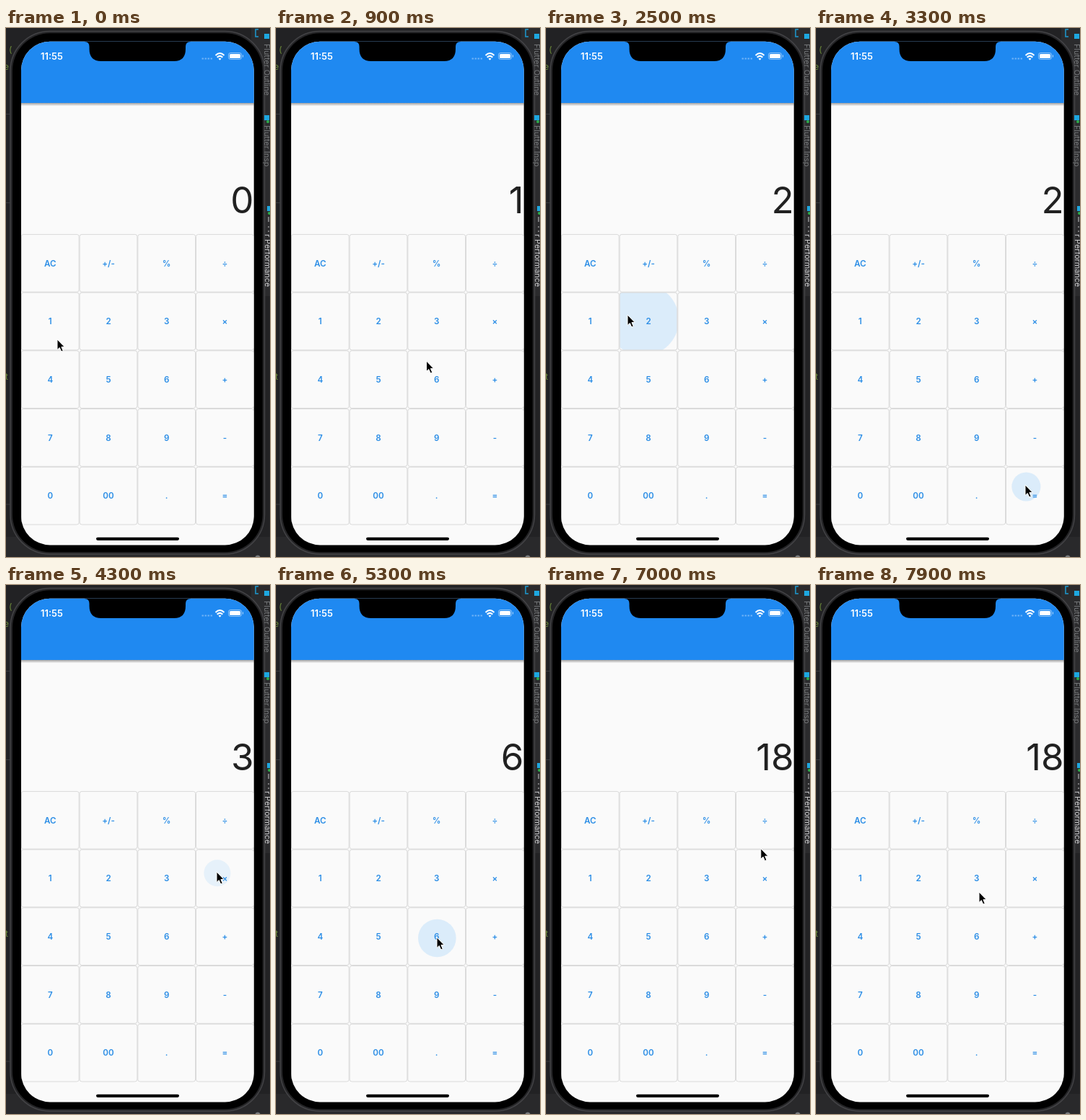
An HTML page for the animation above (8000 ms loop, 366 by 734 pixels).

```html
<!DOCTYPE html>
<html lang="en">
<head>
<meta charset="utf-8">
<title>Calculator</title>
<style>
  html, body { margin: 0; height: 100%; overflow: hidden; background: #202022; }
  svg { display: block; width: 366px; height: 734px; }
  text { font-family: Inter, Roboto, sans-serif; }
  .key text { font-size: 11.6px; font-weight: 600; fill: #2c8ee6; text-anchor: middle; }
  .side { font-size: 10.8px; fill: #77797b; }
</style>
</head>
<body>
<svg viewBox="0 0 366 734">
  <defs>
    <clipPath id="screen"><rect x="21" y="18.800" width="322.700" height="698.600" rx="40"/></clipPath>
    <linearGradient id="shade" x2="0" y2="1">
      <stop stop-color="#000" stop-opacity=".35"/>
      <stop offset="1" stop-color="#000" stop-opacity="0"/>
    </linearGradient>
  </defs>

  <!-- desktop behind the phone -->
  <rect width="366" height="734" fill="#222224"/>
  <rect x="340" width="26" height="372" fill="#2b2b2d"/>
  <path d="M0 119.500H6M0 242.500H6M0 661H6" stroke="#3b3b3d"/>
  <rect y="706" width="366" height="28" fill="#29292b"/>
  <g font-size="12" fill="#6d8c3a">
    <text x="4" y="34">(</text>
    <text x="-3" y="58">e</text>
    <text x="-1" y="488">t</text>
  </g>
  <path d="M350 2H346V12H350" fill="none" stroke="#1c9ad0" stroke-width="1.500"/>
  <circle cx="349" cy="735" r="3.500" fill="#77797b"/>

  <!-- phone -->
  <rect x="6" y="4.500" width="352.500" height="725.500" rx="55" fill="#242426" stroke="#434346" stroke-width="1.500"/>
  <rect x="9" y="7.300" width="346.700" height="720" rx="52" fill="#000"/>

  <g fill="#1ea7e0">
    <rect x="358" y="8" width="7" height="7"/>
    <rect x="358" y="121" width="7" height="7"/>
    <rect x="362" y="247" width="4" height="7"/>
  </g>
  <g fill="#2fae4b">
    <circle cx="363" cy="130" r="2"/>
    <circle cx="365" cy="257" r="2"/>
  </g>
  <text class="side" transform="translate(358 22) rotate(90)">Flutter Outline</text>
  <text class="side" transform="translate(358 135) rotate(90)">Flutter Insp</text>
  <text class="side" transform="translate(359 286) rotate(90)" style="fill:#d0d0d2">r Performance</text>
  <path d="M364 262V269M364 275V277M364 281V283" stroke="#c8c8ca"/>

  <g clip-path="url(#screen)">
    <rect x="20" y="18" width="325" height="701" fill="#fafafa"/>
    <rect x="20" y="104" width="325" height="4.500" fill="url(#shade)"/>
    <rect x="20" y="18" width="325" height="86" fill="#1f89f1"/>
    <path d="M109 18V19Q115.500 19 115.500 26V29Q115.500 46 132 46H233Q249 46 249 29V26Q249 19 256 19V18Z"/>
    <text x="48" y="44" font-size="12.900" font-weight="600" fill="#fff">11:55</text>
    <path d="M271.500 42.500H286" stroke="#fff" stroke-opacity=".35" stroke-width="2" stroke-dasharray="2.500 1.500"/>
    <path d="M290.500 38Q296.500 32 302.500 38M292.700 40.700Q296.500 37 300.300 40.700" fill="none" stroke="#fff" stroke-width="2"/>
    <path d="M294.500 42.500Q296.500 40.800 298.500 42.500L296.500 44.800Z" fill="#fff"/>
    <rect x="308.500" y="34.500" width="18" height="9" rx="2.800" fill="none" stroke="#fff" stroke-opacity=".5"/>
    <rect x="310" y="36" width="15" height="6" rx="1.500" fill="#fff"/>
    <path d="M328.500 37.500V40.500" stroke="#fff" stroke-opacity=".6"/>
    <text id="display" x="343.500" y="257" font-size="51" fill="#212121" text-anchor="end">0</text>
    <g id="keys"></g>
    <rect x="125" y="706.700" width="115" height="4.200" rx="2.100"/>
  </g>

  <path id="cursor" d="M0 0V14.500L3.300 11.500L5.700 17L8.200 15.900L5.900 10.600H10.200Z" stroke="#fff"/>
</svg>
<script>
const LOOP = 8000, PITCH = 80.7, SIZE = 79.8;
const R0 = 17, R1 = 61.5;
const labels = 'AC +/- % ÷ 1 2 3 × 4 5 6 + 7 8 9 - 0 00 . ='.split(' ');

// pointer moves: start, end, target x, target y
const home = [71, 432];
const moves = [
  [640, 1100, 300, 482], [1380, 2030, 113, 398], [2600, 3190, 290, 634],
  [3590, 4090, 292, 398], [4400, 4890, 223, 489], [5590, 6030, 321, 640],
  [6540, 7090, 296, 345], [7430, 7890, 226, 426]
];
// taps: key, down, up, shown number
const taps = [
  ['1', 430, 500, '1'], ['+', 1320, 1390, '1'], ['2', 2340, 2420, '2'],
  ['=', 3220, 3310, '3'], ['×', 4250, 4320, '3'], ['6', 5195, 5285, '6'],
  ['=', 6055, 6125, '18'], ['÷', 7240, 7310, '18']
];

const $ = id => document.getElementById(id);
const clamp = v => Math.min(1, Math.max(0, v));
const smooth = v => v * v * (3 - 2 * v);

// cubic-bezier(.25, .1, .25, 1)
function ease(x) {
  const curve = (a, b, s) => 3 * a * s * (1 - s) ** 2 + 3 * b * s * s * (1 - s) + s ** 3;
  let lo = 0, hi = 1;
  for (let i = 0; i < 16; i++) {
    const mid = (lo + hi) / 2;
    if (curve(.25, .25, mid) < x) lo = mid; else hi = mid;
  }
  return curve(.1, 1, lo);
}

const center = i => [61.3 + PITCH * (i % 4), 326.3 + PITCH * Math.floor(i / 4)];

$('keys').innerHTML = labels.map((label, i) => {
  const [x, y] = center(i);
  const box = `x="${x - SIZE / 2}" y="${y - SIZE / 2}" width="${SIZE}" height="${SIZE}" rx="3"`;
  return `<g class="key"><clipPath id="k${i}"><rect ${box}/></clipPath>
    <circle clip-path="url(#k${i})" fill="#2196f3" opacity="0"/>
    <rect ${box} fill="none" stroke="#d9d9d9"/>
    <text x="${x}" y="${y + 4.2}">${label}</text></g>`;
}).join('');
const ripples = [...document.querySelectorAll('.key circle')];

function pointer(t) {
  let [x, y] = home;
  for (const [start, end, tx, ty] of moves) {
    const p = smooth(clamp((t - start) / (end - start)));
    x += (tx - x) * p;
    y += (ty - y) * p;
  }
  return [x, y];
}

function drawRipple([key, down, up], t) {
  const i = labels.indexOf(key), [cx, cy] = center(i), [px, py] = pointer(down);
  const held = Math.min(t, up) - down;
  const grow = ease(clamp(held / 1000 + Math.max(0, t - up) / 225));
  const alpha = .14 * clamp((t - down) / 75) * (1 - clamp((t - up - 225) / 150));
  const c = ripples[i];
  c.setAttribute('cx', px + .5 + (cx - px - .5) * grow);
  c.setAttribute('cy', py + 1.5 + (cy - py - 1.5) * grow);
  c.setAttribute('r', R0 + (R1 - R0) * grow);
  c.setAttribute('opacity', alpha);
}

function draw(now) {
  const t = now % LOOP;
  let shown = '0';
  ripples.forEach(c => c.setAttribute('opacity', 0));
  for (const tap of taps) {
    if (t >= tap[2]) shown = tap[3];
    if (t >= tap[1] && t < tap[2] + 375) drawRipple(tap, t);
  }
  $('display').textContent = shown;
  $('cursor').setAttribute('transform', `translate(${pointer(t)})`);
  requestAnimationFrame(draw);
}
draw(0);
</script>
</body>
</html>
```
